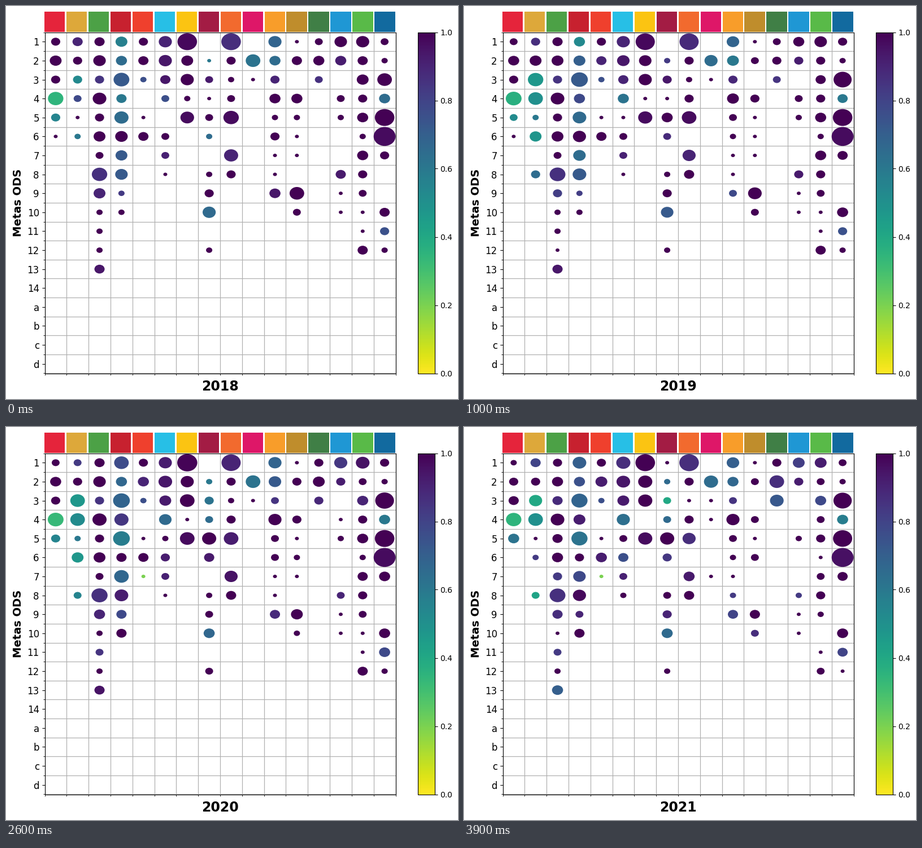
A matplotlib script that plays this animation: 800 px wide and 697 px high, repeating every 4.5 s.

```python
import numpy as np
import matplotlib.pyplot as plt
from matplotlib.animation import FuncAnimation
from matplotlib.cm import ScalarMappable
from matplotlib.collections import PatchCollection
from matplotlib.patches import Circle, Rectangle

WIDTH, HEIGHT, DPI = 800, 697, 100
GOALS, TARGETS = 16, 18
YEARS = (2018, 2019, 2020, 2021)
MAX_COUNT = 46
TILE_COLORS = (
    "#e5243b", "#dda83a", "#4ca146", "#c7212f", "#ef402d", "#27bfe6",
    "#fbc412", "#a31c44", "#f26a2e", "#de1768", "#f89d2a", "#bf8d2c",
    "#407f46", "#1f97d4", "#59ba48", "#126a9f",
)

plt.rcParams["font.family"] = "DejaVu Sans"
fig = plt.figure(figsize=(WIDTH / DPI, HEIGHT / DPI), dpi=DPI, facecolor="white")


def pixel_axes(left, top, right, bottom):
    return fig.add_axes([left / WIDTH, 1 - bottom / HEIGHT,
                         (right - left) / WIDTH, (bottom - top) / HEIGHT])


def label(x, y, text, **style):
    return fig.text(x / WIDTH, 1 - y / HEIGHT, text, weight="bold",
                    ha="center", va="baseline", rotation_mode="anchor", **style)


bubbles = {year: [] for year in YEARS}
scores = {year: [] for year in YEARS}


def goal(number, targets):
    """Add one column: target -> counts, or (counts, scores); scalars hold all years."""
    for target, entry in targets.items():
        counts, values = entry if isinstance(entry, tuple) else (entry, 1)
        per_year = zip(YEARS, np.broadcast_to(counts, 4), np.broadcast_to(values, 4))
        for year, count, value in per_year:
            if count:
                radius = 0.5 * np.log1p(count) / np.log1p(MAX_COUNT)
                bubbles[year].append(Circle((number, target), radius))
                scores[year].append(value)


goal(1, {1: [4, 3, 3, 2], 2: [7, 6, 6, 4], 3: [4, 4, 4, 5],
         4: ([14, 15, 15, 14], [.35, .37, .33, .35]),
         5: ([4, 3, 4, 6], [.55, .52, .55, .62]), 6: [1, 1, 0, 0]})
goal(2, {1: ([5, 4, 3, 5], [.9, .87, .83, .8]), 2: [4, 7, 4, 4],
         3: ([4, 14, 12, 9], [.53, .47, .47, .4]),
         4: ([3, 12, 12, 12], [.78, .5, .52, .5]),
         5: ([1, 2, 2, 1], [1, .6, .6, 1]),
         6: ([2, 7, 7, 2], [.6, .48, .47, .83]),
         8: ([0, 4, 3, 3], [1, .65, .55, .42])})
goal(3, {1: [5, 5, 5, 4], 2: [8, 7, 8, 6], 3: ([4, 4, 4, 5], [.85, .85, .85, .88]),
         4: [10, 10, 11, 10], 5: [4, 4, 4, 5], 6: [7, 7, 7, 6],
         7: ([3, 3, 3, 4], [1, 1, 1, .83]), 8: ([14, 15, 16, 15], .86),
         9: ([7, 4, 6, 5], [.9, .82, .9, .87]), 10: [2, 2, 2, 1],
         11: ([2, 2, 3, 3], [1, 1, .85, .83]), 12: [2, 1, 2, 2],
         13: ([5, 5, 5, 6], [.94, .94, .95, .7])})
goal(4, {1: ([7, 6, 12, 10], [.57, .53, .77, .7]),
         2: ([6, 7, 6, 6], [.65, .7, .67, .75]),
         3: ([15, 18, 18, 16], [.72, .72, .68, .68]),
         4: ([5, 6, 11, 7], [.6, .78, .84, .92]),
         5: ([11, 10, 18, 16], [.65, .66, .58, .62]), 6: [8, 9, 5, 4],
         7: ([7, 8, 12, 8], [.72, .65, .67, .78]),
         8: ([8, 10, 10, 9], [.72, .72, .92, .98]),
         9: ([2, 2, 5, 3], [.83, .82, .78, .9]), 10: [2, 2, 5, 5]})
goal(5, {1: 4, 2: ([5, 5, 6, 7], [1, .9, .9, .92]), 3: (2, .76), 5: 1,
         6: ([5, 5, 5, 6], [1, 1, 1, .92]), 7: ([0, 0, 1, 1], .2)})
goal(6, {1: ([9, 9, 9, 11], [.9, .9, .92, .87]), 2: ([9, 8, 10, 10], .94),
         3: ([5, 5, 7, 7], [.94, .9, .93, .93]),
         4: ([3, 6, 8, 9], [.76, .62, .66, .64]), 5: [0, 1, 2, 3],
         6: ([3, 3, 4, 5], [1, 1, .92, .76]), 7: (3, .91), 8: [1, 1, 1, 2]})
goal(7, {1: ([30, 28, 33, 30], [.98, .98, .99, 1]), 2: [7, 8, 9, 11],
         3: [9, 9, 12, 11], 4: [2, 1, 1, 0], 5: ([10, 11, 12, 11], .97)})
goal(8, {1: [0, 0, 0, 1], 2: ([1, 2, 2, 2], [.6, .83, .6, .66]),
         3: ([3, 4, 4, 3], [.93, .94, .62, .4]),
         4: ([1, 1, 3, 3], [1, 1, .65, .66]), 5: [3, 6, 11, 11],
         6: ([2, 3, 5, 4], [.65, .88, .93, .84]), 8: [2, 2, 2, 3],
         9: ([4, 4, 3, 4], [1, 1, 1, .9]),
         10: ([9, 8, 6, 6], [.66, .72, .67, .66]), 12: [2, 2, 3, 2]})
goal(9, {1: ([30, 28, 28, 30], [.87, .88, .9, .87]), 2: 4, 3: [2, 2, 2, 1],
         4: [3, 4, 4, 4], 5: ([14, 12, 12, 9], [.97, .97, .92, .87]),
         7: ([11, 9, 9, 6], [.9, .9, .95, .93]), 8: [4, 5, 5, 5]})
goal(10, {2: ([12, 9, 12, 11], [.62, .65, .62, .65]), 3: 1,
          4: [0, 0, 0, 1], 7: [0, 0, 0, 1]})
goal(11, {1: ([9, 8, 9, 8], [.68, .68, .68, .7]),
          2: ([6, 7, 8, 6], [.65, .6, .72, .67]),
          3: ([4, 4, 3, 3], [.9, .89, .85, .85]), 4: [6, 7, 9, 9],
          5: [2, 3, 3, 3], 6: [4, 2, 3, 2], 7: 1,
          8: ([1, 1, 1, 2], [1, 1, 1, .83]),
          9: ([6, 3, 5, 5], [.94, .78, .88, .8])})
goal(12, {1: 1, 2: [5, 3, 4, 3], 4: [6, 4, 4, 3], 5: [2, 1, 1, 1],
          6: [1, 1, 2, 3], 7: [1, 1, 1, 0], 9: [12, 10, 7, 5],
          10: ([3, 3, 2, 3], [1, 1, 1, .87])})
goal(13, {1: [3, 3, 4, 4], 2: ([6, 4, 7, 12], [1, 1, 1, .87]),
          3: ([3, 3, 4, 10], [.86, .85, .89, .73])})
goal(14, {1: ([8, 6, 9, 7], [1, 1, .84, .82]), 2: ([6, 4, 4, 4], .92),
          4: [3, 3, 1, 0], 5: 2, 8: ([5, 4, 3, 2], [.93, .93, .9, .83]),
          9: 1, 10: 1})
goal(15, {1: ([9, 8, 10, 7], [1, 1, .95, .92]), 2: [5, 4, 3, 3],
          3: ([7, 5, 6, 6], [1, 1, .9, .78]), 4: [4, 4, 4, 3],
          5: [6, 6, 6, 4], 6: [2, 2, 2, 1], 7: [6, 6, 5, 3], 8: 4,
          9: [3, 3, 3, 2], 10: [1, 1, 1, 0], 11: 1, 12: [5, 5, 5, 3]})
goal(16, {1: [3, 4, 4, 3], 2: 2, 3: [12, 23, 26, 24],
          4: ([6, 5, 6, 6], [.65, .6, .6, .58]), 5: [30, 30, 30, 28],
          6: (MAX_COUNT, [.97, .97, .97, .96]), 7: [4, 5, 6, 5],
          10: [5, 6, 6, 6], 11: ([4, 4, 6, 5], [.75, .75, .78, .8]),
          12: [2, 2, 2, 1]})

# Chart grid: labelled ticks at cell centres, grid lines on cell borders.
ax = pixel_axes(68.5, 46.5, 689.5, 651.5)
ax.set(xlim=(0.5, GOALS + 0.5), ylim=(TARGETS + 0.5, 0.5), xticks=[])
ax.set_xticks(np.arange(GOALS + 1) + 0.5, minor=True)
ax.set_yticks(np.arange(TARGETS + 1) + 0.5, minor=True)
ax.set_yticks(range(1, TARGETS + 1), [*map(str, range(1, 15)), *"abcd"], fontsize=12)
ax.grid(which="minor", color="#b0b0b0", linewidth=0.9)
ax.set_axisbelow(True)

# Header tiles
for i, color in enumerate(TILE_COLORS):
    left = 68 + 38.95 * i
    fig.add_artist(Rectangle((left / WIDTH, 1 - 46 / HEIGHT), 36.3 / WIDTH,
                             36 / HEIGHT, color=color, linewidth=0))

fig.colorbar(ScalarMappable(cmap="viridis_r"), cax=pixel_axes(728.5, 46.5, 758.5, 651.5))
label(27, 349, "Metas ODS", size=14, rotation=90)
year_label = label(379, 682, "", size=17)

layers = {}
for year in YEARS:
    layer = PatchCollection(bubbles[year], cmap="viridis_r", linewidth=0, zorder=2)
    layer.set_array(np.array(scores[year]))
    layer.set_clim(0, 1)
    layers[year] = ax.add_collection(layer, autolim=False)


def update(frame):
    # Two steps per year; the last year holds for a third step.
    current = YEARS[min(frame // 2, 3)]
    for year, layer in layers.items():
        layer.set_visible(year == current)
    year_label.set_text(str(current))
    return [*layers.values(), year_label]


animation = FuncAnimation(fig, update, frames=9, interval=500, repeat=True,
                          repeat_delay=0, blit=False)
plt.show()
```
